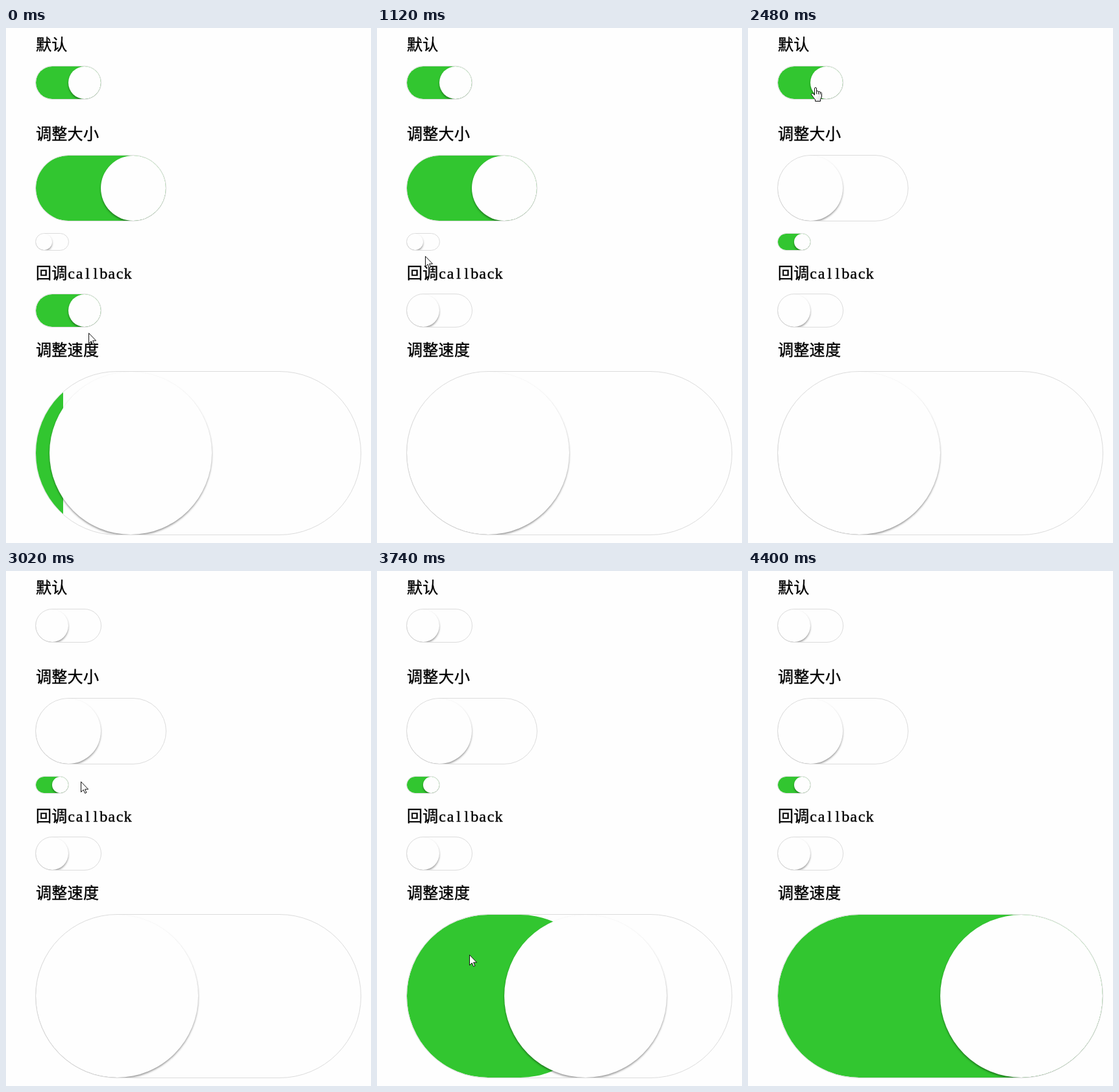
An HTML page that plays this animation: 562x791 px, repeating every 4.8 s.

```html
<!DOCTYPE html>
<html lang="zh">
<head>
<meta charset="utf-8">
<style>
  html, body { margin: 0; width: 100%; height: 100%; overflow: hidden; background: #fefefe; }
  .switch {
    position: absolute; left: 45px; box-sizing: border-box; overflow: hidden;
    border: 1px solid #dcdcdc; border-radius: 999px; background: #fefefe;
  }
  .fill, .knob { position: absolute; left: 0; top: 0; height: 100%; border-radius: 999px; }
  .fill { background: #32c630; }
  .knob { background: #fefefe; box-shadow: 0 2px 3px rgba(0, 0, 0, .4); }
  svg { position: absolute; left: 0; top: 0; }
  text {
    font: 500 24px "Noto Sans CJK SC", "Noto Sans CJK", sans-serif;
    letter-spacing: .3px; stroke: #000; stroke-width: .4px;
  }
  #latin { font: 24px "Liberation Serif", serif; letter-spacing: 0; text-anchor: middle; }
</style>
</head>
<body>
<div id="stage"></div>
<svg width="562" height="791" viewBox="0 0 562 791">
  <defs>
    <linearGradient id="skin" x1="0" y1="0" x2="1" y2="1">
      <stop offset=".5" stop-color="#fff"/>
      <stop offset="1" stop-color="#d4d4d8"/>
    </linearGradient>
  </defs>
  <text x="46" y="33.5">默认</text>
  <text x="46" y="170.5">调整大小</text>
  <text x="46" y="385">回调<tspan id="latin">callback</tspan></text>
  <text x="46" y="502.5">调整速度</text>
  <g id="cursor" stroke="#111" stroke-linejoin="round">
    <path id="arrow" fill="#fff" d="M.5.7V16.5L4.2 13 6.6 18.4 8.9 17.4 6.6 12.2H11.6Z"/>
    <g id="hand">
      <path fill="url(#skin)" d="M5.5 12V2Q5.5.5 7 .5T8.5 2V6.6Q8.6 5.6 10 5.7T11.4 7.2Q11.8 6.3 13 6.6T14.2 8.1Q14.6 7.3 15.6 7.8T16.5 9.6V14Q16.5 16 14.5 18.5V21.5H6.5V19Q4.5 17 3.2 14.8L.9 11.6Q.2 10.3 1.3 9.7T3.6 10.2Z"/>
      <path fill="none" d="M8.5 6.5V10.5M11.4 7.2V10.8M14.2 8.1V11"/>
    </g>
  </g>
</svg>
<script>
const LOOP = 4800;

// y: top of the box; h: inner height; from/to: 1 is on; start and length of the slide in ms
const switches = [
  { y: 58, h: 50, from: 1, to: 0, start: 2562, length: 400 },
  { y: 195, h: 100, from: 1, to: 0, start: 1880, length: 290 },
  { y: 315, h: 25, from: 0, to: 1, start: 1335, length: 400 },
  { y: 408, h: 50, from: 1, to: 0, start: 495, length: 400 },
  { y: 527, h: 250, from: 1, to: 0, start: -496, length: 610, again: 3396 }
];

// The screen refreshes only at these moments: time, cursor left, cursor top, shape
const steps = [
  [0, 127, 468, "arrow"], [150, 122, 461, "arrow"], [280, 118, 455, "arrow"],
  [430, 108, 442, "hand"], [550, 104, 440, "hand"], [700, 104, 437, "hand"],
  [850, 90, 389, "arrow"], [970, 79, 355, "arrow"], [1120, 74, 350, "arrow"],
  [1240, 62, 338, "hand"], [1360, 54, 332, "hand"], [1510, 104, 303, "arrow"],
  [1630, 170, 261, "hand"], [1780, 192, 258, "hand"], [1900, 206, 256, "hand"],
  [2050, 190, 208, "hand"], [2170, 172, 158, "arrow"], [2320, 100, 93, "hand"],
  [2480, 97, 91, "hand"], [2630, 97, 91, "hand"], [2780, 97, 91, "hand"],
  [2900, 106, 170, "arrow"], [3020, 115, 323, "arrow"], [3170, 118, 558, "hand"],
  [3320, 141, 589, "hand"], [3470, 138, 589, "hand"], [3620, 138, 589, "hand"],
  [3740, 142, 589, "arrow"], [3890, 142, 589, "arrow"], [4010, 230, 612, "arrow"],
  [4130, 348, 645, "hand"], [4280, 477, 742, "hand"], [4400, 0, 0, "none"]
];

const byId = id => document.getElementById(id);
const cursor = byId("cursor");

// Set the Latin letters on an even pitch, like a typewriter
const latin = byId("latin");
latin.setAttribute("x", [...latin.textContent].map((_, i) => 100.7 + 12.4 * i).join(" "));

function addDiv(parent, name) {
  const div = document.createElement("div");
  div.className = name;
  return parent.appendChild(div);
}

for (const s of switches) {
  const box = addDiv(byId("stage"), "switch");
  box.style.top = s.y + "px";
  box.style.width = 2 * s.h + 2 + "px";
  box.style.height = s.h + 2 + "px";
  s.fill = addDiv(box, "fill");
  s.knob = addDiv(box, "knob");
  s.knob.style.width = s.h + "px";
}

function swing(t) {
  const p = Math.min(1, Math.max(0, t));
  return 0.5 - Math.cos(p * Math.PI) / 2;
}

function slide(s, t) {
  if (s.again && t >= s.again) return swing((t - s.again) / s.length);
  return s.from + (s.to - s.from) * swing((t - s.start) / s.length);
}

function draw(time) {
  const [t, x, y, shape] = steps.findLast(step => step[0] <= time);
  for (const s of switches) {
    const left = Math.round(slide(s, t) * s.h);
    s.knob.style.left = left + "px";
    s.fill.style.width = 2 * left + "px";
  }
  cursor.setAttribute("transform", `translate(${x} ${y})`);
  for (const id of ["arrow", "hand"]) byId(id).style.display = id === shape ? "" : "none";
}

let origin;
function tick(now) {
  origin ??= now;
  draw(Math.max(0, now - origin) % LOOP);
  requestAnimationFrame(tick);
}
draw(0);
requestAnimationFrame(tick);
</script>
</body>
</html>
```
